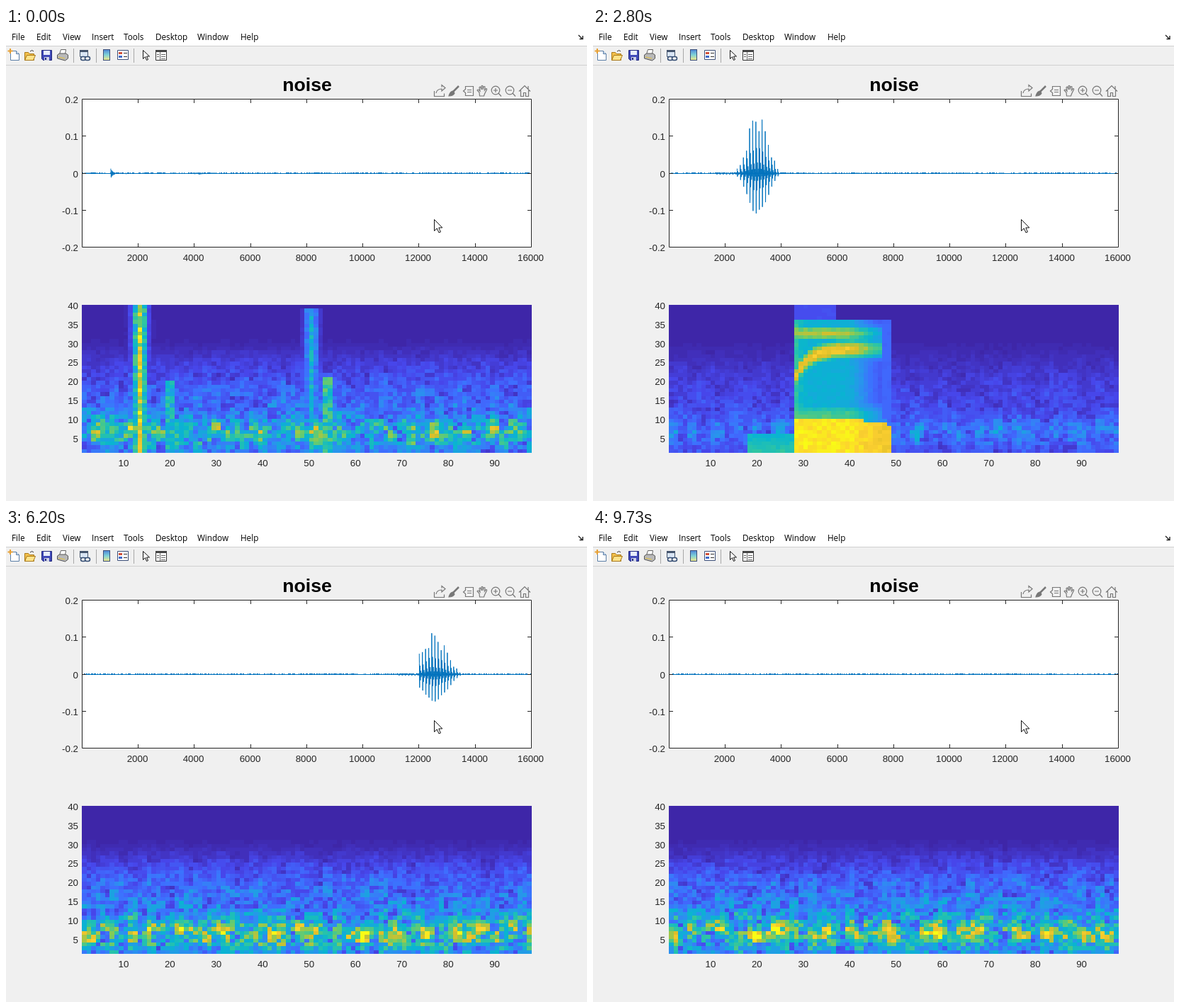
Write an HTML page with a canvas that moves like this. It is 820x668 px and loops after 10000 ms.

```html
<!DOCTYPE html>
<html lang="en">
<head>
<meta charset="utf-8">
<title>Speech detector</title>
<style>
  html, body { margin: 0; width: 100%; height: 100%; overflow: hidden; background: #f0f0f0; }
  canvas, svg { position: absolute; left: 0; top: 0; width: 820px; height: 668px; }
  .menu { font: 11.7px "Open Sans", "Noto Sans", sans-serif; fill: #000; }
  .labels { font: 13.33px "Liberation Sans", Arial, sans-serif; fill: #262626; }
  .title { font: bold 26.67px "Liberation Sans", Arial, sans-serif; fill: #000; text-anchor: middle; }
</style>
</head>
<body>
<canvas id="plots" width="820" height="668"></canvas>
<svg viewBox="0 0 820 668">
  <rect width="820" height="25" fill="#fff"/>
  <path d="M0 25.5H820M0 52.5H820" stroke="#d0d0d0"/>
  <g id="menu" class="menu"></g>
  <path d="M808 10l5 5m1-4v4.5h-4.5" fill="none" stroke="#222" stroke-width="1.4"/>

  <g id="toolbar">
    <path d="M95.5 29V49M127.5 29V49M180.5 29V49" stroke="#a8a8a8"/>
    <path d="M6.5 32.5h8l4 4v9h-12z" fill="#fff" stroke="#5b7ea6"/>
    <path d="M14.5 32.5v4h4" fill="#cfe0f2" stroke="#5b7ea6"/>
    <path d="M6 29v7M2.5 32.5h7" stroke="#e8a033" stroke-width="2"/>
    <path d="M26.5 45.5v-11h5l2 2h6v9z" fill="#f3c04c" stroke="#a87818"/>
    <path d="M26.5 45.5l3-7h12l-3 7z" fill="#ffe38a" stroke="#a87818"/>
    <path d="M34 33q3-3 5 0" fill="none" stroke="#333"/>
    <path d="M50.5 31.5h14v14h-12l-2-2z" fill="#4049b8" stroke="#22297d"/>
    <path d="M53 32h9v6h-9z" fill="#e8eefc"/><path d="M54 41h7v5h-7z" fill="#cfd3e6"/><path d="M55 42h2v3h-2z" fill="#22297d"/>
    <path d="M75.5 37l2-6.5h7l-1 6.5" fill="#fff" stroke="#666"/>
    <path d="M72.5 38l3-2h9l3 2v5l-4 3-11-3z" fill="#b9b9b9" stroke="#555"/>
    <path d="M74 41l9 2" stroke="#e3c13a"/>
    <path d="M104.5 31.5h11v9h-11z" fill="#d9e5f5" stroke="#44546d"/><path d="M104 31h12v3h-12z" fill="#44546d"/>
    <g fill="#f0f0f0" stroke="#344d73" stroke-width="1.5">
      <rect x="105.5" y="40.5" width="7" height="5" rx="2.5"/>
      <rect x="111.5" y="40.5" width="7" height="5" rx="2.5"/>
    </g>
    <rect x="137.5" y="30.5" width="9" height="15" fill="url(#bar)" stroke="#3c4f78"/>
    <path d="M157.5 31.5h15v13h-15z" fill="#fff" stroke="#3c4f78"/>
    <path d="M159 34h5v3h-5z" fill="#d4523a"/><path d="M159 39h5v3h-5z" fill="#3f69c9"/>
    <path d="M166 35.5h5M166 40.5h5" stroke="#333"/>
    <path d="M193.5 31.5v12l3-3 2 5 2-1-2-4.5h4z" fill="#fff" stroke="#111"/>
    <path d="M211.5 31.5h15v14h-15z" fill="#fff" stroke="#333"/><path d="M211 31h16v3h-16z" fill="#444"/>
    <path d="M217.5 34v11M213 37.5h3M213 40.5h3M219 37.5h6M219 40.5h6M219 43.5h6" stroke="#666"/>
  </g>
  <linearGradient id="bar" x2="0" y2="1">
    <stop stop-color="#4f86d8"/><stop offset=".5" stop-color="#7fd3d8"/><stop offset="1" stop-color="#f4e884"/>
  </linearGradient>

  <g fill="none" stroke="#777" stroke-width="1.2">
    <path d="M604.5 89v7.5h14v-4M607 92q1-6 8-6v3l5-4.5-5-4v3"/>
    <path d="M639 82l-8 8" stroke-width="2.5"/><path d="M631 89q-4 0-6 7q6 0 8-4z" fill="#777"/>
    <path d="M648.5 82.5h11v13h-11v-4l-3-2.5 3-2.5zM651 87.5h6M651 90.5h6"/>
    <path d="M668 91l-3-3q1-2 3 0l1 1-1-5q1-2 2 0l1 3v-5q1-1.5 2 0v5l1-4q1.5-1 2 0l-.5 5 1.5-2q2-1 1.5 1l-3 6-1 3h-6z"/>
    <g id="lens"><circle cx="691" cy="88" r="5.8"/><path d="M695 92l4 4.5M688 88h6"/></g>
    <path d="M691 85v6"/>
    <use href="#lens" x="20"/>
    <path d="M724 89.5l8-8 8 8M726.5 88v8.5h4v-5h3v5h4V88M737 86v-4"/>
  </g>

  <text class="title" x="425" y="89">noise</text>
  <path id="axes" fill="none" stroke="#262626"/>
  <g id="labels" class="labels"></g>
  <path d="M604.5 270.5v16l3.800-3.500 2.700 6 2.400-1-2.600-6h5z" fill="#fff" stroke="#111"/>
</svg>

<script>
const LEFT = 107, WIDTH = 635, TOP = 100, HEIGHT = 210, ZERO = 205, PERIOD = 10000;
const COLS = 97, ROWS = 39, SPEC_TOP = 391, SPEC_HEIGHT = 209;
const BLOCK = 800, HOP = 80, BUFFER = 16000, PITCH = 111, WORD_LENGTH = 1600;
const $ = id => document.getElementById(id);
const ctx = $("plots").getContext("2d");

const bell = (x, width) => Math.exp(-x * x / (width * width));
const smooth = t => {
  t = Math.min(1, Math.max(0, t));
  return t * t * (3 - 2 * t);
};
const rand = (a, b) => {
  let h = Math.imul(a + 17, 374761393) + Math.imul(b + 5, 668265263) | 0;
  h = Math.imul(h ^ h >>> 13, 1274126177);
  return ((h ^ h >>> 16) >>> 0) / 2 ** 32;
};

// Ten audio blocks arrive per second; the screen refreshes fifteen times.
const blocksAt = ms => Math.floor(Math.floor(ms * .015 + .05) * 2 / 3);

// Sounds are placed on one continuous recording.
const word = (ms, sample, size, peak, floor) => {
  const start = sample + blocksAt(ms) * BLOCK;
  return { start, size, peak, floor, column: Math.round(start / HOP) - 3 };
};
const words = [word(1800, 10428, .165, .43, .08), word(7070, 5600, .112, .3, .5)];
const clicks = [
  { start: 1030, size: .013, length: 160, column: 12, top: 39, level: .8 },
  { start: 1560, size: .002, length: 100, column: 18.5, top: 19, level: .52 },
  { start: 4000, size: .002, length: 120, column: 49, top: 38, level: .42 },
  { start: 4150, size: .003, length: 300, column: 52.5, top: 20, level: .58 }
];

const parula = [[62, 38, 168], [71, 71, 235], [62, 111, 255], [39, 151, 235], [8, 181, 208],
  [49, 198, 159], [129, 204, 89], [220, 189, 41], [252, 207, 48], [249, 251, 21]];
const palette = Array.from({ length: 65 }, (_, i) => {
  const p = i / 64 * 9, k = Math.min(8, Math.floor(p));
  return `rgb(${parula[k].map((v, j) => Math.round(v + (parula[k + 1][j] - v) * (p - k)))})`;
});

const noiseFloor = r => .27 * bell(r - 5, 4.5) + .24 * (1 - smooth((r - 13) / 18));

// One bright spot of random place and strength in every six columns.
function spotLevel(c, r) {
  const bin = Math.floor(c / 6);
  const x = bin * 6 + 1 + rand(bin, 800) * 4, y = 3.5 + rand(bin, 801) * 3;
  return .45 * rand(bin, 802) * bell(c - x, 1.5) * bell(r - y, 2.2);
}

function noiseLevel(c, r) {
  const patch = rand(c >> 1, 100 + Math.floor(r / 3));
  return noiseFloor(r) * (.2 + .9 * rand(c, r) + .7 * patch) + spotLevel(c, r);
}

function wordLevel(u, r) {
  if (u < -10 || u > 20) return 0;
  if (u < 0) return r < 5 ? .53 - r * .02 : 0;
  if (r >= 35) return .13 * (u < 9);
  if (u > 18 && r > 7) return .2;
  const fade = smooth((u - 10) / 10);
  if (r < 9 - 2 * fade) return .95 - .1 * fade;
  const formant = 27 - 7 * Math.exp(-u / 3);
  return Math.max(
    .42 - .28 * fade + .12 * Math.exp(-u),
    .6 * bell(r - 9, 5) * (1 - .5 * fade),
    .85 * bell(r - formant, 3.2) * (1 - .35 * fade),
    .74 * bell(r - 31, 2.6) * (1 - .5 * fade)
  );
}

function drawSpectrum(blocks) {
  const first = blocks * BLOCK / HOP;
  const speech = words.find(w => w.column - first > -21 && w.column - first < COLS + 10);
  const gain = speech ? .43 : first < 55 ? .8 : 1;
  const edgeX = i => Math.round(LEFT + i * WIDTH / COLS);
  const edgeY = r => Math.round(SPEC_TOP + (ROWS - r) * SPEC_HEIGHT / ROWS);
  for (let i = 0; i < COLS; i++) {
    const c = first + i;
    for (let r = 0; r < ROWS; r++) {
      const grain = rand(c, r);
      let v = gain * noiseLevel(c, r);
      for (const k of clicks) {
        if (r < k.top) v = Math.max(v, k.level * bell(c - k.column, 1.4) * (.75 + .5 * grain));
      }
      if (speech) v = Math.max(v, wordLevel(c - speech.column, r) * (.95 + .1 * grain));
      ctx.fillStyle = palette[Math.round(Math.min(1, v) * 64)];
      ctx.fillRect(edgeX(i), edgeY(r + 1), edgeX(i + 1) - edgeX(i), edgeY(r) - edgeY(r + 1));
    }
  }
}

function voice({ size, peak, floor }, s) {
  const u = s / WORD_LENGTH, p = s % PITCH / PITCH;
  const envelope = u < peak ? floor + (1 - floor) * smooth(u / peak) : 1 - smooth((u - peak) / (1 - peak));
  return size * envelope * Math.exp(-3.4 * p) * Math.cos(8 * Math.PI * p);
}

function trace(start, length, offset, amplitude) {
  ctx.beginPath();
  for (let s = 0; s <= length; s += 4) {
    ctx.lineTo(LEFT + (start + s - offset) * WIDTH / BUFFER, ZERO + .5 - amplitude(s) * 525);
  }
  ctx.stroke();
}

function drawWave(blocks) {
  const offset = blocks * BLOCK;
  ctx.fillStyle = "#fff";
  ctx.fillRect(LEFT, TOP, WIDTH, HEIGHT);
  ctx.save();
  ctx.beginPath();
  ctx.rect(LEFT, TOP, WIDTH, HEIGHT);
  ctx.clip();
  ctx.fillStyle = ctx.strokeStyle = "#0072bd";
  ctx.fillRect(LEFT, ZERO, WIDTH, 1);
  for (let x = 0; x < WIDTH; x++) {
    if (rand(x + blocks * 32, 700) > .5) ctx.fillRect(LEFT + x, ZERO - 1, 1, 1);
  }
  for (const w of words) {
    trace(w.start, WORD_LENGTH, offset, s => voice(w, s));
    trace(w.start - 800, 800, offset, s => .003 * Math.sin(s / 18));
  }
  for (const { start, size, length } of clicks) {
    trace(start, length, offset, s => size * Math.exp(-2 * s / length) * Math.cos(s / 5));
  }
  ctx.restore();
}

function buildStatic() {
  const text = (x, y, label, anchor = "middle") =>
    `<text x="${x}" y="${y}" text-anchor="${anchor}">${label}</text>`;
  $("menu").innerHTML = [["File", 8], ["Edit", 43], ["View", 80], ["Insert", 121], ["Tools", 166],
    ["Desktop", 211], ["Window", 270], ["Help", 331]].map(([s, x]) => text(x, 17, s, "start")).join("");

  let axes = "M107.5 100.5H741.5V309.5H107.5Z", labels = "";
  for (let n = 1; n <= 8; n++) {
    const x = Math.round(LEFT + (n * 2000 - 1) / 15999 * (WIDTH - 1));
    if (n < 8) axes += `M${x + .5} 100v6M${x + .5} 310v-6`;
    labels += text(x - .5, 329, n * 2000);
    labels += text(102, Math.round(397 + (8 - n) * 26.8), n * 5, "end");
  }
  ["0.2", "0.1", "0", "-0.1", "-0.2"].forEach((label, i) => {
    const y = Math.round(TOP + i * (HEIGHT - 1) / 4);
    if (i % 4) axes += `M107 ${y + .5}h6M742 ${y + .5}h-6`;
    labels += text(102, y + 6, label, "end");
  });
  for (let n = 10; n <= 90; n += 10) labels += text(LEFT + (n - 1) * WIDTH / COLS, 619, n);
  $("axes").setAttribute("d", axes);
  $("labels").innerHTML = labels;
}

let drawn = -1;
function render(now) {
  const blocks = blocksAt(Math.max(0, now) % PERIOD);
  if (blocks === drawn) return;
  drawn = blocks;
  drawWave(blocks);
  drawSpectrum(blocks);
}

buildStatic();
render(0);
const began = performance.now();
requestAnimationFrame(function loop() {
  render(performance.now() - began);
  requestAnimationFrame(loop);
});
</script>
</body>
</html>
```
